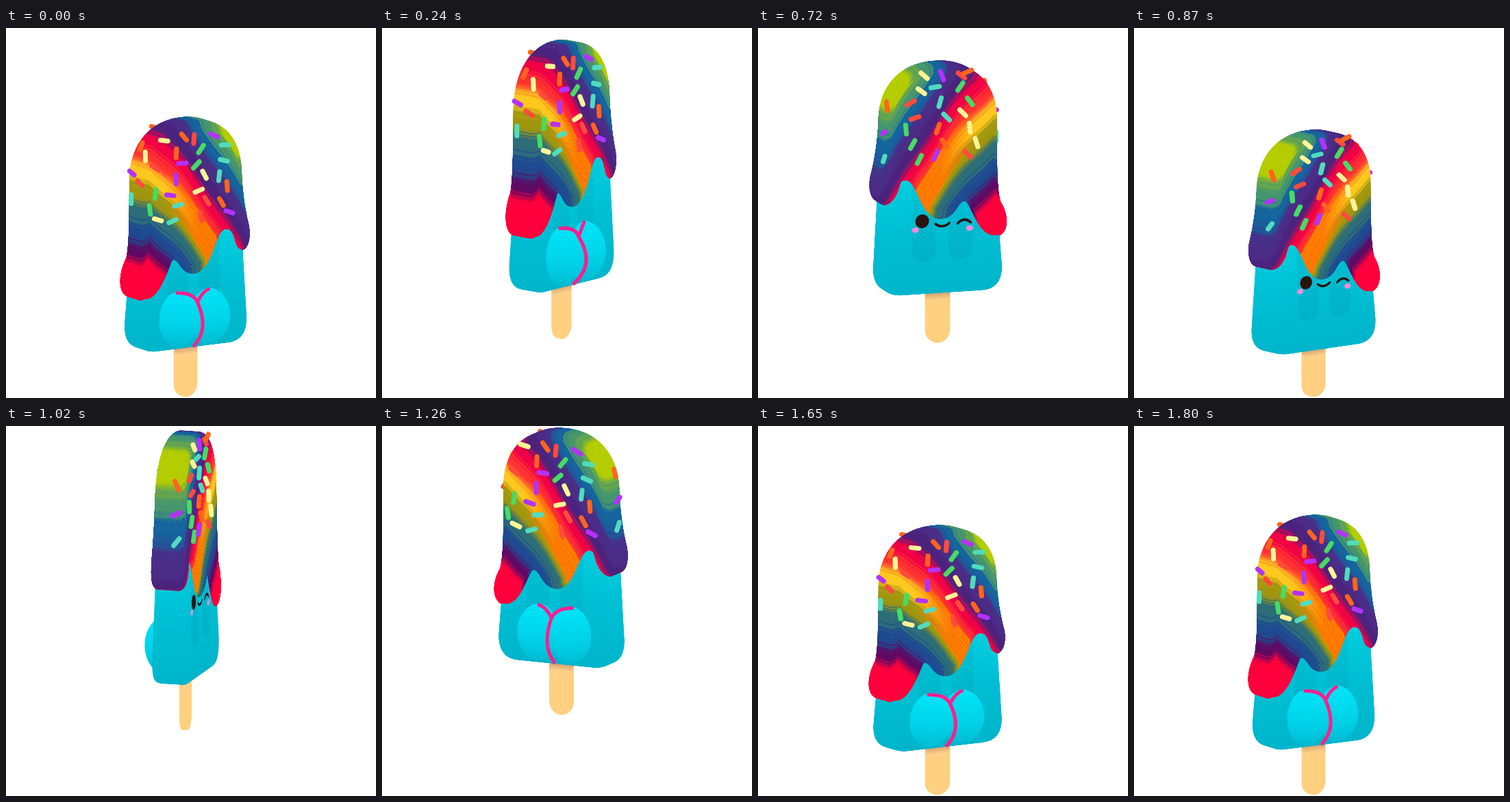
An HTML page with a canvas that plays this animation: 540x540 px, repeating every 1.83 s.

```html
<!DOCTYPE html>
<html>
<head>
<meta charset="utf-8">
<style>
html, body { margin: 0; width: 100%; height: 100%; overflow: hidden; background: #fff; }
canvas { display: block; width: 540px; height: 540px; }
</style>
</head>
<body>
<canvas id="stage" width="540" height="540"></canvas>
<script>
const ctx = stage.getContext('2d');
const LOOP = 1830, STEP = 30;
const PITCH = 0.2;                              // how far near points sink on screen
const BODY_Z = 27.4, BODY_TAPER = 0.00114;      // half depth, thinning towards the top
const ICING_Z = 30, ICING_TAPER = 0.0007;

// Local space: origin at the stick's tip, y down, z out of the back.
const icing = new Path2D('M-86-320C-86-374-52-405 0-405S86-374 86-320C87-290 92-262 98-240' +
  'C104-204 79-196 73-222C69-234 66-240 57-240C38-241 34-180 2-180' +
  'C-22-180-24-204-35-204C-44-204-54-151-82-151C-106-151-103-183-92-197' +
  'C-84-215-86-280-86-320Z');
const body = new Path2D('M-60-260L60-260L87-228L93-108Q93-75 62-75L-62-75Q-93-75-93-108L-86-200Z');
const stick = new Path2D('M-18-95L18-95L18-18A18 18 0 0 1-18-18Z');

function ramp(y0, y1, ...colors) {
  const g = ctx.createLinearGradient(0, y0, 0, y1);
  colors.forEach((c, i) => g.addColorStop(i / (colors.length - 1), c));
  return g;
}
const bodyFill = ramp(-245, -76, '#00cfe0', '#00bed3', '#00b5cb');
const bumFill = ramp(-160, -78, '#00e4f8', '#00d4ea', '#00bad2');
const stickFill = ramp(-75, -50, '#c8966e', '#ffd087', '#ffd080');

const clamp = (v, lo = 0, hi = 1) => Math.min(hi, Math.max(lo, v));
const smooth = (t, from, to) => { const u = clamp((t - from) / (to - from)); return u * u * (3 - 2 * u); };
const fract = v => v - Math.floor(v);
const noise = n => fract(Math.sin(n * 12.9898) * 43758.5453);

// Marbled icing: evenly spaced colours along a bent diagonal, with streaks.
const rainbow = ['#f5cd00', '#b4cd00', '#46966e', '#1464a0', '#4b2d87', '#4b237d', '#f00046',
  '#ff3232', '#ffc81e', '#a0960f', '#2d6e78', '#1e4b91', '#5f0a64', '#ff003c'];
const rgb = hex => [1, 3, 5].map(i => parseInt(hex.slice(i, i + 2), 16));
function bandColor(v) {
  const p = clamp((v + 505) / 31, 0, rainbow.length - 1.001), i = Math.floor(p);
  const u = smooth(p - i, 0.2, 0.8), to = rgb(rainbow[i + 1]);
  return `rgb(${rgb(rainbow[i]).map((a, j) => Math.round(a + (to[j] - a) * u))})`;
}
const bend = x => 1.25 * x + 4 + x * x / 450 + 4 * Math.sin(x / 16);

function makeTexture() {
  const tex = document.createElement('canvas');
  tex.width = 440; tex.height = 560;
  const g = tex.getContext('2d');
  g.scale(2, 2);
  g.translate(110, 415);
  g.clip(icing);
  g.lineWidth = 3.2;
  for (let v = -580; v < -20; v += 2) {
    const color = bandColor(v + (noise(v) - 0.5) * 16);
    g.strokeStyle = color;
    if (v > -286 && v < -222) {
      const fade = g.createLinearGradient(-55, 0, 5, 0);
      fade.addColorStop(0, color);
      fade.addColorStop(1, `rgb(255,${95 + Math.round(50 * noise(v + 7))},0)`);
      g.strokeStyle = fade;
    }
    g.beginPath();
    for (let x = -112; x <= 112; x += 4) g.lineTo(x, v + bend(x));
    g.stroke();
  }
  return tex;
}
const texture = makeTexture();

// Sprinkles: an even quasi-random scatter on each face, the outermost ones on the rim.
const paint = ['#46dc64', '#50dcbe', '#ff4b3c', '#b432ff', '#fff596', '#ff641e'];
function scatter(side, count) {
  return Array.from({ length: count }, (_, i) => {
    const n = i + (side > 0 ? 1 : 40);
    const y = -398 + 136 * fract(n * 0.5698);
    const half = 86 * Math.sqrt(1 - clamp((-y - 320) / 86) ** 2);
    const across = 2 * fract(n * 0.7549) - 1;
    const rim = Math.abs(across) > 0.9;
    const x = half * (rim ? Math.sign(across) : across);
    const z = side * ICING_Z * (1 + y * ICING_TAPER) * (rim ? 0.5 : 0.97);
    const angle = Math.PI * noise(n * 3.7);
    const dx = rim ? 0 : 6.5 * Math.cos(angle), dy = 6.5 * Math.sin(angle);
    const dz = rim ? 6.5 * Math.cos(angle) : 0;
    return { color: paint[n % paint.length], rim, from: [x - dx, y - dy, z - dz], to: [x + dx, y + dy, z + dz] };
  });
}
const sprinkles = [...scatter(1, 28), ...scatter(-1, 28)];

// Motion: two hops, each with half a turn, a stretched launch and a squashed landing.
const hops = [{ start: 100, apex: 530, land: 860 }, { start: 890, apex: 1221, land: 1609 }];
const height = (t, { start, apex, land }) => t <= start || t >= land ? 0 :
  t < apex ? 1 - ((apex - t) / (apex - start)) ** 3.2 : 1 - ((t - apex) / (land - apex)) ** 2;
const launch = (t, { start, land }) => t <= start || t >= land ? 0 :
  0.127 * Math.exp((start - t) / 228) * (1 - Math.exp((start - t) / 30));
const bump = (t, from, to) => Math.sin(Math.PI * clamp((t - from) / (to - from)));
const sum = (t, fn) => fn(t, hops[0]) + fn(t, hops[1]);
const yawAt = t => (32 + 180 * (smooth(t, 95, 850) + smooth(t, 780, 1554))) * Math.PI / 180;
const stretchAt = t => 1 + sum(t, launch) - 0.05 * (bump(t, 0, 130) + bump(t, 840, 920) + bump(t, 1600, 1790));

let c, s;   // cosine and sine of the yaw
const project = ([x, y, z]) => [x * c + z * s, y + PITCH * (z * c - x * s)];

// Draw on the plane at depth z.
function plane(z, taper, draw) {
  ctx.save();
  ctx.transform(c, -PITCH * s, z * s * taper, 1 + PITCH * z * c * taper, z * s, PITCH * z * c);
  draw();
  ctx.restore();
}
// Shrink slices near the faces to round the edges.
function bevel(e, kx, ky, pivot) {
  const inset = 1 - Math.sqrt(1 - clamp((Math.abs(e) - 0.6) / 0.4) ** 2);
  ctx.translate(0, pivot);
  ctx.scale(1 - kx * inset, 1 - ky * inset);
  ctx.translate(0, -pivot);
}
function fill(path, color) {
  ctx.fillStyle = color;
  ctx.fill(path);
}
function oval(x, y, rx, ry, color) {
  ctx.fillStyle = color;
  ctx.beginPath();
  ctx.ellipse(x, y, rx, ry, 0, 0, 7);
  ctx.fill();
}

function drawSlice(z) {
  if (Math.abs(z) <= 4) plane(z, 0, () => fill(stick, stickFill));
  const bodyZ = z * 1.1;
  if (Math.abs(bodyZ) <= BODY_Z + 0.2) plane(bodyZ, BODY_TAPER, () => {
    bevel(bodyZ / BODY_Z, 0.05, 0.03, -240);
    fill(body, bodyFill);
    if (Math.abs(bodyZ) < 26.5) return;
    ctx.fillStyle = 'rgba(0,90,120,.08)';
    for (const x of [-48, 10]) {
      ctx.beginPath();
      ctx.roundRect(x, -245, 38, 126, 16);
      ctx.fill();
    }
  });
  plane(z, ICING_TAPER, () => {
    bevel(z / ICING_Z, 0.08, 0.1, -320);
    ctx.drawImage(texture, -110, -415, 220, 280);
  });
}

function drawBum(outward) {
  for (let i = 0; i <= 18; i++) {
    const u = (outward ? i : 18 - i) / 18, r = Math.sqrt(1 - u * u);
    plane(20 + 33 * u, 0, () => {
      for (const x of [-26, 26]) oval(x, -119, 32 * r, 40 * r, bumFill);
    });
  }
}
function drawString() {
  ctx.strokeStyle = '#ff1f8f';
  ctx.lineWidth = 5;
  ctx.beginPath();
  const strand = (ctrl, end) => {
    ctx.moveTo(...project([0, -143, 33]));
    ctx.quadraticCurveTo(...project(ctrl), ...project(end));
  };
  strand([0, -110, 66], [0, -78, 24]);
  for (const side of [-1, 1]) strand([8 * side, -158, 34], [27 * side, -157, 20]);
  ctx.stroke();
}

function drawFace() {
  const ink = '#2d120e', blush = '#f58cdc';
  plane(-BODY_Z, BODY_TAPER, () => {
    ctx.scale(-1, 1);
    oval(-41, -169, 5.5, 4, blush);
    oval(42, -167, 5.5, 4, blush);
    oval(-30.5, -181, 10.5, 10, ink);
    ctx.strokeStyle = ink;
    ctx.lineWidth = 3.5;
    ctx.beginPath();
    ctx.moveTo(-10, -176);
    ctx.quadraticCurveTo(0, -168, 11, -176);
    ctx.moveTo(24, -175);
    ctx.quadraticCurveTo(34, -184, 44, -175);
    ctx.stroke();
  });
}

function drawSprinkles(near) {
  ctx.lineWidth = 7;
  for (const { color, rim, from, to } of sprinkles) {
    const facing = rim ? -from[0] * s > 0 : from[2] * c > 0;
    if (facing !== near) continue;
    ctx.strokeStyle = color;
    ctx.beginPath();
    ctx.moveTo(...project(from));
    ctx.lineTo(...project(to));
    ctx.stroke();
  }
}

function draw(t) {
  const yaw = yawAt(t), stretch = stretchAt(t), lift = 118 * sum(t, height);
  const back = Math.cos(yaw) > 0, dir = back ? 1 : -1;
  c = dir * Math.max(0.03, Math.abs(Math.cos(yaw)));
  s = Math.sin(yaw);

  ctx.setTransform(1, 0, 0, 1, 0, 0);
  ctx.fillStyle = '#fff';
  ctx.fillRect(0, 0, 540, 540);
  ctx.translate(262, 537.5 - lift);
  ctx.scale(1 + 1.4 * Math.max(0, 1 - stretch), stretch);
  ctx.lineCap = 'round';

  if (!back) {
    drawString();
    drawBum(false);
  }
  drawSprinkles(false);
  for (let z = -ICING_Z; z <= ICING_Z; z++) drawSlice(z * dir);
  if (back) {
    drawBum(true);
    drawString();
  } else drawFace();
  drawSprinkles(true);
}

const begin = performance.now();
function tick() {
  const t = (performance.now() - begin) % LOOP;
  draw(t - t % STEP);
  requestAnimationFrame(tick);
}
tick();
</script>
</body>
</html>
```
